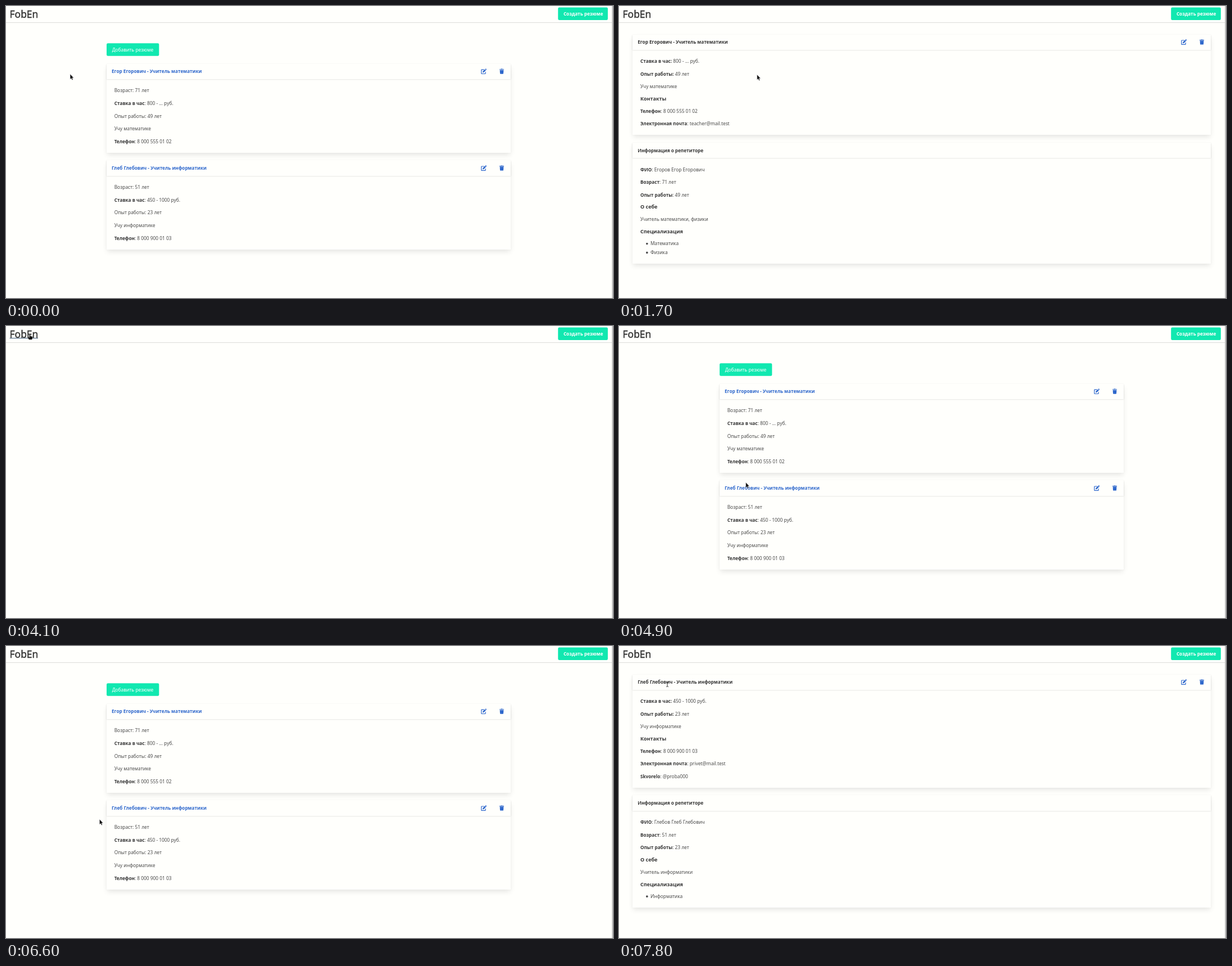
An HTML page that plays this animation: 1080 px wide and 519 px high, repeating every 8000 ms.

```html
<!DOCTYPE html>
<html lang="ru">
<head>
<meta charset="utf-8">
<title>FobEn</title>
<style>
  html, body { margin: 0; width: 100%; height: 100%; overflow: hidden; background: #fffffc; }
  #stage { position: relative; width: 1080px; height: 519px; overflow: hidden; background: #fffffc; }
  #stage div, svg { position: absolute; }
  svg { left: 0; top: 0; width: 1080px; height: 519px; }
  .page { inset: 0; visibility: hidden; }
  .card { box-shadow: 0 4.5px 9px -1px rgba(10,10,10,.1), 0 0 0 .6px rgba(10,10,10,.02); background: #fffffc; }
  .head { left: 0; top: 0; width: 100%; height: 27.2px; box-shadow: 0 1.3px 2.3px rgba(10,10,10,.14); }
  .bar { left: 0; top: 29px; width: 1078px; height: 1px; background: #dcdcda; }
  .scroll { left: 1077.6px; top: 0; width: 2.4px; height: 519px; background: #c2c2c2; }
  text { font: 8.36px "Noto Sans", "Open Sans", sans-serif; fill: #4a4a4a; white-space: pre; }
  .b { font-weight: 700; font-size: 8.2px; fill: #363636; }
  .sub { font-weight: 700; font-size: 9px; fill: #363636; }
  .link { fill: #2f68cc; }
  .link.hover { fill: #363636; text-decoration: underline; }
  .logo { font-size: 17.4px; fill: #363636; stroke: #363636; stroke-width: .45px; }
  .white { fill: #fff; }
  .btn { fill: #11e8b0; }
  .icon { fill: #2f68cc; }
  .icon .line { fill: none; stroke: #2f68cc; stroke-width: 1.2; stroke-linecap: round; stroke-linejoin: round; }
</style>
</head>
<body>
<div id="stage"></div>
<script>
const LOOP = 8000, ROW = 22.65, HEAD = 27.2, PAD = 13.6;

const egor = {
  name: 'Егор Егорович', full: 'Егоров Егор Егорович', subject: 'математик',
  age: '71 лет', rate: '800 - ... руб.', work: '49 лет', phone: '8 000 555 01 02',
  contacts: ['*Электронная почта*: teacher@mail.test'],
  about: 'Учитель математики, физики', skills: ['Математика', 'Физика']
};
const gleb = {
  name: 'Глеб Глебович', full: 'Глебов Глеб Глебович', subject: 'информатик',
  age: '51 лет', rate: '450 - 1000 руб.', work: '23 лет', phone: '8 000 900 01 03',
  contacts: ['*Электронная почта*: privet@mail.test', '*Skvorelo*: @proba000'],
  about: 'Учитель информатики', skills: ['Информатика']
};
const title = p => `${p.name} - Учитель ${p.subject}и`;

// y is the vertical middle of the line; *...* marks bold
const text = (x, y, s, cls = '', drop = 3.1) =>
  `<text x="${x}" y="${y + drop}" class="${cls}">` +
  s.replace(/\*(.+?)\*/g, '<tspan class="b">$1</tspan>') + '</text>';

const rows = (x, y, list) => list.map((s, i) => text(x, y + i * ROW, s)).join('');

const button = (x, y, w, s, cls) =>
  `<rect class="btn" x="${x}" y="${y}" width="${w}" height="${ROW}" rx="2.3"/>` +
  text(x + 9.7, y + ROW / 2, s, 'white ' + cls);

const icons = (right, y) => `
  <g class="icon" transform="translate(${right - 53} ${y - 5})">
    <path class="line" d="M5.4 2H1.5Q.8 2 .8 2.7V8.7Q.8 9.4 1.5 9.4H7.4Q8.1 9.4 8.1 8.7V6.4"/>
    <path d="M3.3 5.2 7.2 1.3 9 3.1 5.1 7 3 7.3ZM7.6.9 8.2.3Q8.6 0 9 .3L10 1.3Q10.3 1.7 10 2.1L9.4 2.7Z"/>
  </g>
  <g class="icon" transform="translate(${right - 20} ${y - 4.6})">
    <path d="M0 .7H2.3L2.8 0H5.2L5.7.7H8V1.8H0ZM.6 2.4H7.4L7 8.3Q6.9 9.2 6.1 9.2H1.9Q1.1 9.2 1 8.3Z"/>
  </g>`;

const card = (x, y, w, h) =>
  `<div class="card" style="left:${x}px;top:${y}px;width:${w}px;height:${h}px"><div class="head"></div></div>`;

const page = (id, boxes, art) => `<div class="page" id="${id}">${boxes}<svg>${art}</svg></div>`;

function listPage() {
  const h = HEAD + 2 * PAD + 4 * ROW + PAD;
  let boxes = '', art = button(179, 66.2, 93.3, 'Добавить резюме', '');
  [egor, gleb].forEach((p, i) => {
    const y = 102.5 + i * 171.9;
    boxes += card(179, y, 719, h);
    art += text(188, y + 13.6, title(p), 'b link') + icons(898, y + 13.6);
    art += rows(192.7, y + 47.6, [
      'Возраст: ' + p.age, '*Ставка в час*: ' + p.rate, 'Опыт работы: ' + p.work,
      `Учу ${p.subject}е`, '*Телефон*: ' + p.phone
    ]);
  });
  return page('list', boxes, art);
}

function detailPage(id, p) {
  const x = 38, top = 50.5, extra = (p.contacts.length - 1) * ROW;
  const info = 242.8 + extra, items = info + 179.3;
  const boxes = card(24, top, 1029, 178.6 + extra) +
    card(24, info, 1029, 199.6 + (p.skills.length - 1) * 16);
  const art = text(33.2, 64, title(p), 'b') + icons(1053, 64) +
    rows(x, 98, ['*Ставка в час:* ' + p.rate, '*Опыт работы:* ' + p.work, `Учу ${p.subject}е`]) +
    text(x, 165, 'Контакты', 'sub') +
    rows(x, 186.4, ['*Телефон*: ' + p.phone, ...p.contacts]) +
    text(33.2, info + 13.6, 'Информация о репетиторе', 'b') +
    rows(x, info + 47.6, ['*ФИО*: ' + p.full, '*Возраст*: ' + p.age, '*Опыт работы*: ' + p.work]) +
    text(x, info + 114.4, 'О себе', 'sub') +
    text(x, info + 136.5, p.about) +
    text(x, info + 158, 'Специализация', 'sub') +
    p.skills.map((s, i) => {
      const y = items + i * 15.9;
      return `<circle cx="49.8" cy="${y + .4}" r="1.8" fill="#4a4a4a"/>` + text(56, y, s);
    }).join('');
  return page(id, boxes, art);
}

const stage = document.getElementById('stage');
stage.innerHTML = listPage() + detailPage('egor', egor) + detailPage('gleb', gleb) + `
  <div class="bar"></div><div class="scroll"></div>
  <svg>
    ${text(6.6, 14.6, 'FobEn', 'logo', 6.2)}
    <path id="underline" d="M6.6 21.8H57" stroke="#3b5878" stroke-width="1.1"/>
    ${button(982.2, 2.4, 88.6, 'Создать резюме', 'b')}
    <g id="cursor" stroke-linejoin="round">
      <path id="arrow" d="M-.4 0V9.2L1.7 7.4 3.1 10.6 4.6 9.9 3.3 6.8H6Z" fill="#111" stroke="#fff" stroke-width=".4"/>
      <path id="hand" d="M-1 .6Q0-.6 1 .6V3.6L4 4.2Q5 4.5 5 5.5L4.4 8.4 3.6 10H-1.6L-4 6.4Q-4.4 5.2-3 5.2L-1 6.6Z" fill="#111" stroke="#fff" stroke-width=".3"/>
      <path id="beam" d="M-2-3.6Q0-3.6 0-2.6Q0-3.6 2-3.6M0-2.6V3.4M-2 4.4Q0 4.4 0 3.4Q0 4.4 2 4.4" fill="none" stroke="#222" stroke-width=".9"/>
    </g>
  </svg>`;

// time, x, y, shape
const moves = [
  [0, 114.5, 121, 'arrow'], [300, 165, 121, 'arrow'], [400, 232, 121.5, 'hand'], [500, 246, 122, 'hand'],
  [1700, 246, 122, 'arrow'], [2200, 214, 150, 'arrow'], [2300, 188, 169.5, 'arrow'],
  [3200, 179.8, 166.5, 'arrow'], [3300, 152, 130, 'arrow'], [3400, 105, 78, 'arrow'],
  [3500, 62, 34, 'arrow'], [3600, 42.5, 14.3, 'hand'],
  [4500, 84, 90, 'arrow'], [4700, 188, 258, 'arrow'], [4900, 226, 278, 'arrow'],
  [5000, 228, 283, 'arrow'], [5100, 229, 286.5, 'arrow'], [5600, 229.5, 286.5, 'hand'],
  [6100, 224, 302, 'arrow'], [6200, 212, 324, 'arrow'], [6300, 197, 336, 'arrow'],
  [6400, 183, 329, 'arrow'], [6500, 173, 318, 'arrow'], [6600, 166.8, 308, 'arrow'],
  [6900, 225, 160.5, 'arrow'], [7500, 168, 146, 'arrow'], [7600, 129, 129, 'arrow'], [7800, 86, 68, 'beam']
];
const pages = [[0, 'list'], [1700, 'egor'], [4100, ''], [4200, 'list'], [6900, 'gleb']];

const $ = id => document.getElementById(id);
const at = (table, t) => table.findLast(row => row[0] <= t);
const show = (el, on) => { el.style.visibility = on ? 'visible' : 'hidden'; };
const firstLink = document.querySelector('.link');

function draw(now) {
  const t = now % LOOP;
  const current = at(pages, t)[1];
  for (const id of ['list', 'egor', 'gleb']) show($(id), id === current);
  const [, x, y, shape] = at(moves, t);
  $('cursor').setAttribute('transform', `translate(${x} ${y})`);
  for (const id of ['arrow', 'hand', 'beam']) show($(id), id === shape);
  show($('underline'), t >= 3600 && t < 4500);
  firstLink.classList.toggle('hover', t >= 400 && t < 1700);
}

const start = performance.now();
function tick() {
  draw(performance.now() - start);
  requestAnimationFrame(tick);
}
tick();
</script>
</body>
</html>
```
